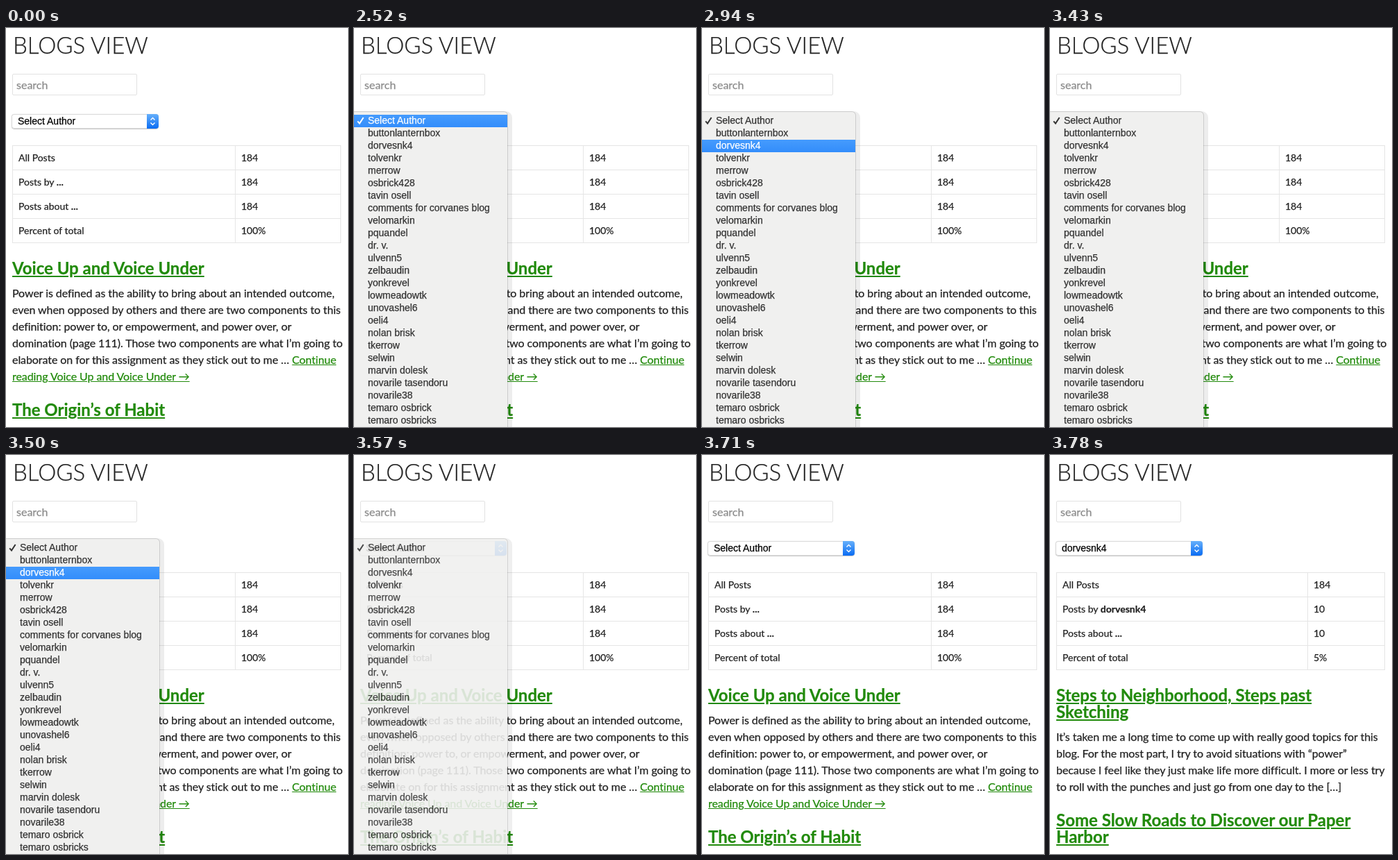
Write an HTML page that moves like this. It is 493 px wide and 575 px high and loops after 7 s.

```html
<!DOCTYPE html>
<html lang="en">
<head>
<meta charset="utf-8">
<title>Blogs view</title>
<style>
html, body { margin: 0; width: 100%; height: 100%; overflow: hidden; background: #fff; }
#stage {
  position: relative; width: 493px; height: 575px; overflow: hidden;
  font: 400 16px/24px Lato, sans-serif; color: #222; white-space: nowrap;
  font-variant-ligatures: none; -webkit-text-stroke: .25px;
}
#stage > *, .view > * { position: absolute; margin: 0; box-sizing: border-box; }
.view { inset: 0; }
h1 { left: 10px; top: 6px; font-size: 33px; line-height: 36px; font-weight: 300; }
h2 { left: 9px; font-size: 24px; line-height: 24px; font-weight: 700; }
p { left: 9px; letter-spacing: -.07px; }
h2, a { color: #218a0b; text-decoration: underline; }

.search {
  left: 9px; top: 66px; width: 180px; height: 31px; padding: 3px 5px;
  border: 1px solid #e2e2e2; border-radius: 2px; color: #8c8c8c;
}
.select {
  left: 8px; top: 124px; width: 212px; height: 21px; padding-left: 9px;
  border-radius: 4px; box-shadow: inset 0 0 0 1px #dadada, 0 .5px 1px rgba(0,0,0,.4);
  font: 14px/21px "Liberation Sans", Arial, sans-serif; color: #000;
}
.select svg { position: absolute; right: 0; top: 0; }

table {
  left: 9px; top: 169px; width: 474px; border-collapse: collapse;
  table-layout: fixed; font-size: 14px;
}
td { height: 34px; line-height: 34px; padding: 0 0 0 8px; border: 1px solid #e5e5e5; }

#menu {
  left: -5px; top: 121px; width: 226px; height: 470px; padding-top: 4px;
  border-radius: 5px; background: #f0f0ef;
  box-shadow: 0 0 0 1px rgba(0,0,0,.14), 3px 3px 0 4px rgba(0,0,0,.07);
  font: 14px/16px "Liberation Sans", Arial, sans-serif; color: #333;
}
#menu div { position: relative; height: 18px; padding-left: 25px; }
#menu div.on { background: linear-gradient(#459bfd, #338dfb); color: #fff; }
#menu svg { position: absolute; left: 9px; top: 3px; }
</style>
</head>
<body>
<div id="stage">
  <h1>BLOGS VIEW</h1>
  <div class="search">search</div>
  <div class="select"><span id="picked"></span>
    <svg width="17" height="21" fill="none">
      <defs><linearGradient id="blue" x2="0" y2="1">
        <stop stop-color="#66b0fb"/><stop offset="1" stop-color="#0a6cf3"/>
      </linearGradient></defs>
      <path d="M0 0H13Q17 0 17 4V17Q17 21 13 21H0Z" fill="url(#blue)"/>
      <path d="M5.5 8.5 8.5 5.5 11.5 8.5M5.5 12.5 8.5 15.5 11.5 12.5" stroke="#fff" stroke-width="1.4"/>
    </svg>
  </div>
  <div class="view" id="all"></div>
  <div class="view" id="filtered"></div>
  <div id="menu"></div>
</div>
<script>
const $ = id => document.getElementById(id);
const LOOP = 7000;
const PICK = 2;

const names = `Select Author
buttonlanternbox
dorvesnk4
tolvenkr
merrow
osbrick428
tavin osell
comments for corvanes blog
velomarkin
pquandel
dr. v.
ulvenn5
zelbaudin
yonkrevel
lowmeadowtk
unovashel6
oeli4
nolan brisk
tkerrow
selwin
marvin dolesk
novarile tasendoru
novarile38
temaro osbrick
temaro osbricks`.split("\n");

const table = (split, author, values) => {
  const labels = ["All Posts", `Posts by <b>${author}</b>`, "Posts about <b>...</b>", "Percent of total"];
  const rows = labels.map((label, i) => `<tr><td>${label}</td><td>${values[i]}</td></tr>`);
  return `<table><colgroup><col style="width:${split}px"><col></colgroup>${rows.join("")}</table>`;
};
const block = (tag, top, ...lines) => `<${tag} style="top:${top}px">${lines.join("<br>")}</${tag}>`;

$("all").innerHTML = table(321, "...", ["184", "184", "184", "100%"])
  + block("h2", 334, "Voice Up and Voice Under")
  + block("p", 370,
    "Power is defined as the ability to bring about an intended outcome,",
    "even when opposed by others and there are two components to this",
    "definition: power to, or empowerment, and power over, or",
    "domination (page 111). Those two components are what I’m going to",
    "elaborate on for this assignment as they stick out to me … <a>Continue",
    "reading Voice Up and Voice Under →</a>")
  + block("h2", 538, "The Origin’s of Habit");

$("filtered").innerHTML = table(362, names[PICK], ["184", "10", "10", "5%"])
  + block("h2", 334, "Steps to Neighborhood, Steps past", "Sketching")
  + block("p", 394,
    "It’s taken me a long time to come up with really good topics for this",
    "blog. For the most part, I try to avoid situations with “power”",
    "because I feel like they just make life more difficult. I more or less try",
    "to roll with the punches and just go from one day to the […]")
  + block("h2", 514, "Some Slow Roads to Discover our Paper", "Harbor");

const tick = `<svg width="12" height="12" fill="none" stroke="currentColor" stroke-width="2"><path d="M1.2 6.3 4 9.6 9.6 1"/></svg>`;
$("menu").innerHTML = names.map((name, i) => `<div>${i ? "" : tick}${name}</div>`).join("");
const items = [...$("menu").children];

// start time, menu opacity, highlighted row, picked row
const steps = [
  [0, 0, -1, 0],
  [2520, 1, 0, 0],
  [2870, 1, 1, 0],
  [2940, 1, PICK, 0],
  [3430, 1, -1, 0],
  [3500, 1, PICK, 0],
  [3570, .89, -1, 0],
  [3640, .4, -1, 0],
  [3710, 0, -1, 0],
  [3780, 0, -1, PICK],
];

let shown;
function draw(now) {
  const time = now % LOOP;
  const step = steps.findLast(s => s[0] <= time);
  if (step !== shown) {
    shown = step;
    const [, opacity, row, picked] = step;
    $("menu").style.opacity = opacity;
    items.forEach((item, i) => item.classList.toggle("on", i === row));
    $("picked").textContent = names[picked];
    $("all").style.display = picked ? "none" : "block";
    $("filtered").style.display = picked ? "block" : "none";
  }
}

const start = performance.now();
function loop() {
  draw(performance.now() - start);
  requestAnimationFrame(loop);
}
loop();
</script>
</body>
</html>
```
